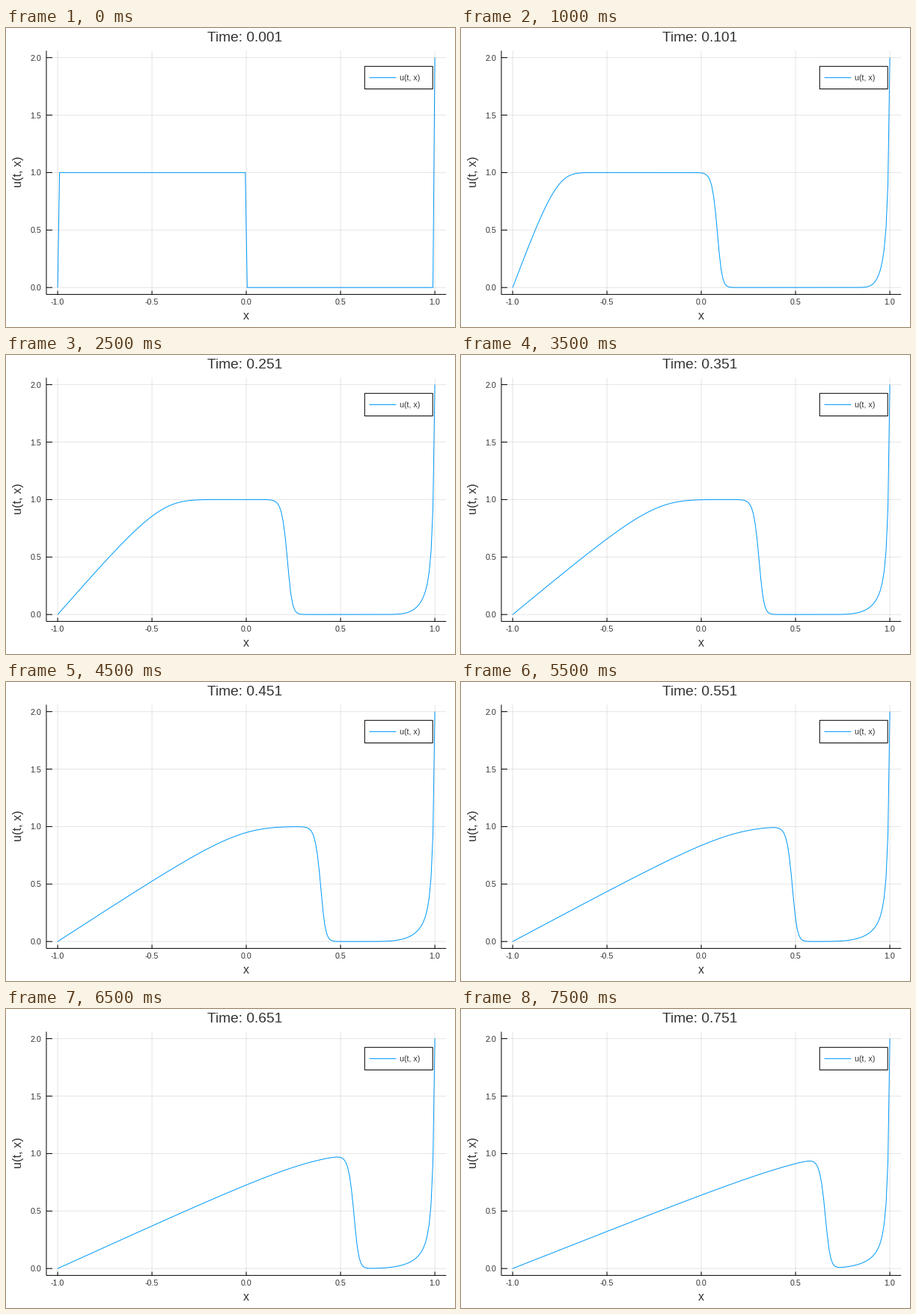
These frames come from a looping animation (600x400 px, 8 s). A matplotlib script:

```python
import matplotlib.pyplot as plt
import numpy as np
from matplotlib.animation import FuncAnimation
from matplotlib.patches import Rectangle

W, H, DPI = 600, 400, 100
PX = 72 / DPI                                # one pixel in points
LEFT, RIGHT, TOP, BOTTOM = 53.94, 588.19, 30.42, 356.4
BLUE, INK = "#009afa", "#333333"
FRAMES, STEPS_PER_FRAME = 16, 50

plt.rcParams["font.family"] = "Liberation Sans"
plt.rcParams["path.snap"] = False


def solve(n=200, dt=0.001, nu=0.01):
    """u_t + (u^2)_x = nu u_xx, upwind in space and explicit in time."""
    x, dx = np.linspace(-1, 1, n), 2 / n
    u = np.where(x <= 0, 1.0, 0.0)
    u[0], u[-1] = 0, 2
    states = []
    for step in range((FRAMES - 1) * STEPS_PER_FRAME + 1):
        if step % STEPS_PER_FRAME == 0:
            states.append((dt * (step + 1), u.copy()))
        left, mid, right = u[:-2], u[1:-1], u[2:]
        advect = 2 * mid * (mid - left) / dx
        diffuse = nu * (right - 2 * mid + left) / dx**2
        u[1:-1] = mid + dt * (diffuse - advect)
    return x, states


def px_x(v):
    return LEFT + (v + 1.06) / 2.12 * (RIGHT - LEFT)


def px_y(v):
    return BOTTOM - (v + 0.06) / 2.12 * (BOTTOM - TOP)


# One axes over the whole stage, in pixels from the top left
fig = plt.figure(figsize=(W / DPI, H / DPI), dpi=DPI, facecolor="white")
ax = fig.add_axes([0, 0, 1, 1])
ax.set(xlim=(0, W), ylim=(H, 0))
ax.axis("off")


def line(xs, ys, color="black", **kw):
    kw = {"linewidth": PX, "solid_capstyle": "butt", **kw}
    return ax.plot(xs, ys, color=color, **kw)[0]


def text(x, y, s, size, ha="center", **kw):
    return ax.text(x, y, s, fontsize=size * PX, color=INK,
                   ha=ha, va="baseline", zorder=5, **kw)


# Grid, ticks and tick labels
for v in np.linspace(-1, 1, 5):
    x = px_x(v)
    line([x, x], [TOP, BOTTOM], alpha=0.1)
    line([x, x], [BOTTOM, BOTTOM - 0.015 * (BOTTOM - TOP)])
    text(x - 0.5, 370, f"{v:.1f}", 10.67)
for v in np.linspace(0, 2, 5):
    y = px_y(v)
    line([LEFT, RIGHT], [y, y], alpha=0.1)
    line([LEFT, LEFT + 0.015 * (RIGHT - LEFT)], [y, y])
    text(47, y + 4, f"{v:.1f}", 10.67, ha="right")

line([LEFT, RIGHT], [BOTTOM, BOTTOM])
line([LEFT, LEFT], [TOP, BOTTOM])

text(321, 389.5, "x", 16)
text(21, 192.5, "u(t, x)", 16.2, rotation=90, rotation_mode="anchor")
title = text(319.5, 18, "", 19.1)

# Curve
xs, states = solve()
curve = line(px_x(xs), px_y(states[0][1]), BLUE)

# Legend
ax.add_patch(Rectangle((479.3, 51.3), 90.9, 30.24, facecolor="white",
                       edgecolor="black", linewidth=PX, zorder=3))
line([485.6, 521.4], [66.42, 66.42], BLUE, zorder=4)
text(526, 70, "u(t, x)", 10.67, ha="left")


def update(i):
    t, u = states[i]
    curve.set_ydata(px_y(u))
    title.set_text(f"Time: {t:.3f}")
    return curve, title


anim = FuncAnimation(fig, update, frames=FRAMES, interval=500,
                     repeat=True, repeat_delay=0)
plt.show()
```
